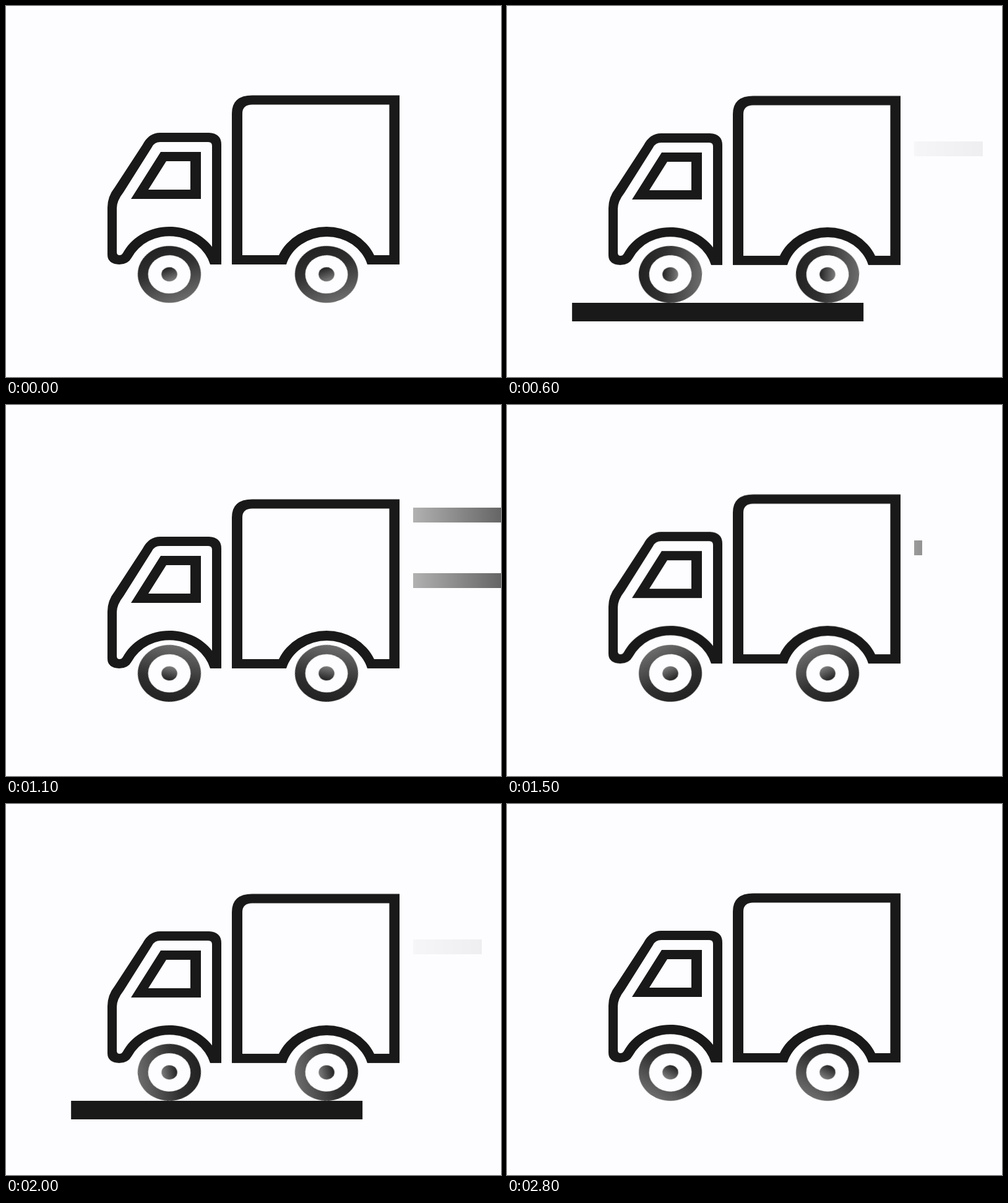
An HTML page for the animation above (2.9 s loop, 800 by 600 pixels).

```html
<!DOCTYPE html>
<html lang="en">
<head>
<meta charset="utf-8">
<title>Delivery truck</title>
<style>
  html, body { margin: 0; width: 100%; height: 100%; overflow: hidden; background: #fdfcfe; }
  svg { display: block; width: 800px; height: 600px; }

  .ink { fill: #191919; fill-rule: evenodd; }
  .body { animation: bounce 700ms infinite; }
  .spin { animation: spin 700ms cubic-bezier(.3, .1, .5, 1) infinite; }
  .road { animation: road 1400ms cubic-bezier(.37, 0, .63, 1) infinite; }
  .line { animation: streak 1400ms ease-in-out infinite backwards; }
  .shade { animation: shade 1400ms ease-in-out infinite backwards; }
  .late, .late .shade { animation-delay: 700ms; }

  @keyframes bounce {
    0%, 10% { transform: translateY(0); animation-timing-function: ease-in-out; }
    55% { transform: translateY(8px); animation-timing-function: ease-in-out; }
    95%, 100% { transform: translateY(0); }
  }
  @keyframes spin {
    to { transform: rotate(-360deg); }
  }
  @keyframes road {
    from { transform: translateX(-498px); }
    to { transform: translateX(1058px); }
  }
  @keyframes streak {
    0% { transform: scaleX(0); opacity: 1; }
    30% { transform: scaleX(1); opacity: 1; }
    46.4%, 100% { transform: scaleX(1); opacity: 0; }
  }
  @keyframes shade {
    0% { opacity: 0; }
    30%, 100% { opacity: 1; }
  }
</style>
</head>
<body>
<svg viewBox="0 0 800 600">
  <defs>
    <linearGradient id="tyre" x1="0" y1="0" x2="0" y2="1">
      <stop offset="0" stop-color="#222"/>
      <stop offset=".4" stop-color="#303030"/>
      <stop offset="1" stop-color="#6c6c6c"/>
    </linearGradient>
    <linearGradient id="hub" x1="0" y1="0" x2="0" y2="1">
      <stop offset="0" stop-color="#222"/>
      <stop offset="1" stop-color="#7c7c7c"/>
    </linearGradient>
    <linearGradient id="fade">
      <stop offset="0" stop-color="#b2b2b2"/>
      <stop offset="1" stop-color="#646464"/>
    </linearGradient>
    <g id="wheel" transform="scale(1.11 1)">
      <g class="spin">
        <path fill="url(#tyre)" fill-rule="evenodd"
          d="M-46 0a46 46 0 0 1 92 0a46 46 0 0 1-92 0ZM-31 0a31 31 0 0 0 62 0a31 31 0 0 0-62 0Z"/>
        <circle r="11.5" fill="url(#hub)"/>
      </g>
    </g>
  </defs>

  <g transform="translate(658 219)">
    <g class="line">
      <rect width="111" height="24" fill="#999"/>
      <rect class="shade" width="111" height="24" fill="url(#fade)"/>
    </g>
  </g>
  <g transform="translate(658 166)">
    <g class="line late">
      <rect width="145" height="24" fill="#999"/>
      <rect class="shade" width="145" height="24" fill="url(#fade)"/>
      <rect y="106" width="145" height="24" fill="#999"/>
      <rect class="shade" y="106" width="145" height="24" fill="url(#fade)"/>
    </g>
  </g>

  <rect class="road ink" y="480" width="471" height="30"/>

  <g class="body ink">
    <!-- box -->
    <path d="M365 418V174Q365 144.5 398 144.5H636V418H584A68 61.5 0 0 0 453 418Z
      M382 403H441A84 76.5 0 0 1 595 403H619.5V159.5H398Q382 159.5 382 174Z"/>
    <!-- cab -->
    <path d="M164 402V326Q164 308 176 293L221 224Q231 205 249 205H328Q348 206 348 224V418H330
      A68 61.5 0 0 0 203 407Q197 418 183 418Q164 417 164 402Z
      M179 398Q179 403 183.500 403Q187 403 189 399.500A84 76.500 0 0 1 333 389.500V226Q333 220 327 220
      H249Q240 220 236 228L190 301Q179 315 179 327Z"/>
    <!-- window -->
    <path d="M250 236H315V312H202ZM259 251L230 297H298V251Z"/>
  </g>

  <use href="#wheel" x="0" y="0" transform="translate(264 434)"/>
  <use href="#wheel" x="0" y="0" transform="translate(518 434)"/>
</svg>
<script>
  const LOOP = 2900, STEP = 100;
  const start = performance.now();
  const moves = document.getAnimations();
  moves.forEach(m => m.pause());

  function tick() {
    const t = (performance.now() - start) % LOOP;
    const time = Math.floor(t / STEP) * STEP;
    // clones inside <use> follow the defs, so all parts share one clock
    moves.forEach(m => { m.currentTime = time; });
    requestAnimationFrame(tick);
  }
  tick();
</script>
</body>
</html>
```
